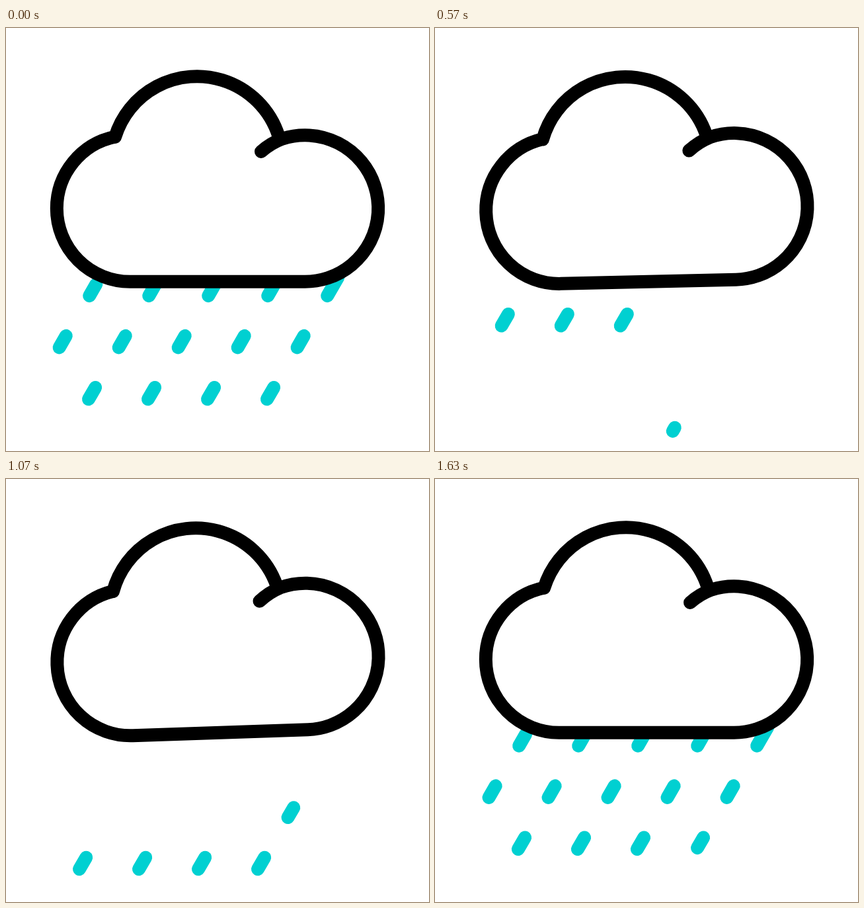
An HTML page with a canvas for the animation above (1670 ms loop, 640x640 px).

```html
<!DOCTYPE html>
<html>
<head>
<meta charset="utf-8">
<title>Rain cloud</title>
<style>
  html, body { margin: 0; width: 100%; height: 100%; overflow: hidden; background: #fff; }
  canvas { display: block; width: 640px; height: 640px; }
</style>
</head>
<body>
<canvas id="stage" width="640" height="640"></canvas>
<script>
const ctx = document.getElementById('stage').getContext('2d');
const LOOP = 1670, STEPS = 50;
const PIVOT = { x: 320, y: 259 };

const clamp01 = v => Math.min(1, Math.max(0, v));
const smooth = u => u * u * (3 - 2 * u);
const progress = (n, from, to) => clamp01((n - from) / (to - from));

// Tail, right bulge, base, left bulge, top.
const cloud = new Path2D();
cloud.moveTo(386, 187);
cloud.quadraticCurveTo(401, 174, 418, 167.7);
cloud.arc(452.4, 273, 110.8, -1.887, Math.PI / 2);
cloud.arc(187.6, 273, 110.8, Math.PI / 2, 4.51);
cloud.arc(289, 202.8, 129.6, -2.845, -0.302);

// Drops appear and vanish row by row; most of the top row joins in
// midway through the second row, from its centre outwards.
const rank = ({ row, col }) =>
  row === 0 && col > 0 ? 7.1 + Math.abs(col - 2) / 10 : row * 5 + col;

const drops = [];
for (let row = 0; row < 3; row++)
  for (let col = row === 2 ? 1 : 0; col < 5; col++) drops.push({ row, col });
drops.sort((a, b) => rank(a) - rank(b));

// The first shower spans the loop seam, slowing down there; the second falls evenly.
const seamShower = {
  grown: n => progress(n, -13.3, -0.9),
  lost: n => progress(n, 3.1, 17.3),
  fall: n => n < 0 ? 1.26 * n - 0.244 * n * n : 1.84 * n + 0.059 * n * n,
  drift: dy => dy * (dy < 0 ? -0.59 : -0.73)
};
const midShower = {
  grown: n => progress(n, 10.9, 23.35),
  lost: n => progress(n, 20.5, 35.6) ** 1.56,
  fall: n => 4.1 * (n - 25),
  drift: dy => 1.9 - 0.554 * dy
};

function drawShower({ grown, lost, fall, drift }, n) {
  const dy = fall(n), dx = drift(dy);
  drops.forEach(({ row, col }, i) => {
    const head = clamp01(grown(n) * drops.length - i);
    const tail = clamp01(lost(n) * drops.length - i);
    if (head <= tail) return;
    const length = row === 0 && col === 4 ? 1.6 : 1;
    const w = 10.2 * length, h = 17.6 * length;
    const x = 126.2 + 90 * col - 45.6 * row + dx;
    const y = 405.2 + 78.2 * row + dy;
    ctx.beginPath();
    ctx.moveTo(x + w * (1 - tail), y - h * (1 - tail));
    ctx.lineTo(x + w * (1 - head), y - h * (1 - head));
    ctx.stroke();
  });
}

// Cloud tilt in degrees: each swing eases to its own extreme, then to rest.
const SWINGS = [[0, 0], [12.4, -4.2], [24, 4.05], [32.7, -2.05], [41, 0]];

function tilt(n) {
  let angle = 0;
  for (let i = 1; i < SWINGS.length; i++) {
    const [from, a] = SWINGS[i - 1], [to, b] = SWINGS[i];
    angle += (b - a) * smooth(progress(n, from, to));
  }
  return angle;
}

function drawCloud(n) {
  ctx.save();
  ctx.translate(PIVOT.x, PIVOT.y);
  ctx.rotate(tilt(n) * Math.PI / 180);
  ctx.translate(-PIVOT.x, -PIVOT.y);
  ctx.fill(cloud);
  ctx.strokeStyle = '#000';
  ctx.stroke(cloud);
  ctx.restore();
}

function render(time) {
  const n = Math.min(STEPS - 1, Math.floor((time % LOOP + 3.4) * 0.03));
  ctx.fillStyle = '#fff';
  ctx.fillRect(0, 0, 640, 640);
  ctx.lineWidth = 20;
  ctx.lineCap = ctx.lineJoin = 'round';
  ctx.strokeStyle = '#00d0d1';
  drawShower(seamShower, n >= 36 ? n - STEPS : n);
  drawShower(midShower, n);
  drawCloud(n);
}

const start = performance.now();
function tick() {
  render(performance.now() - start);
  requestAnimationFrame(tick);
}
tick();
</script>
</body>
</html>
```
